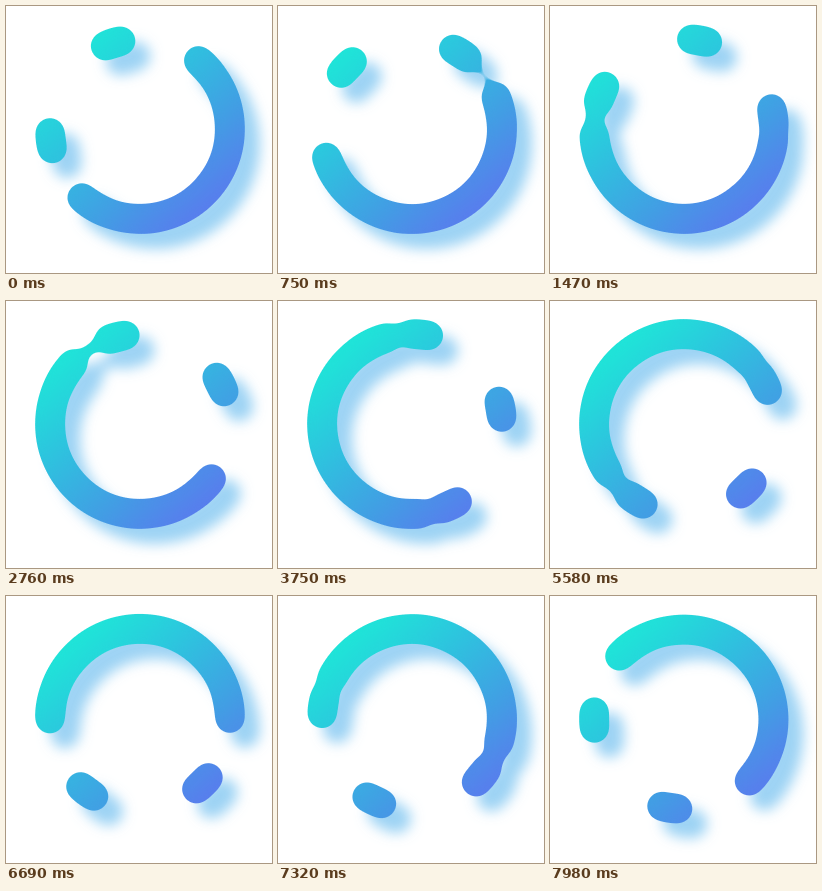
Animation, 266 px wide and 267 px high, one loop 8000 ms. Source, as an HTML page:

```html
<!DOCTYPE html>
<html lang="en">
<head>
<meta charset="utf-8">
<title>Gooey ring</title>
<style>
  html, body { margin: 0; width: 100%; height: 100%; overflow: hidden; background: #fff; }
  svg { display: block; width: 100%; height: 100%; }
  path { fill: none; stroke: url(#tint); stroke-width: 30; stroke-linecap: round; }
</style>
</head>
<body>
<svg viewBox="0 0 266 267">
  <defs>
    <linearGradient id="tint" gradientUnits="userSpaceOnUse" x1="70" y1="45" x2="204" y2="206">
      <stop offset="0" stop-color="#1fe4d8"/>
      <stop offset=".3" stop-color="#2cc6de"/>
      <stop offset=".7" stop-color="#429de4"/>
      <stop offset="1" stop-color="#5a7aee"/>
    </linearGradient>
    <filter id="goo" filterUnits="userSpaceOnUse" x="0" y="0" width="266" height="267"
            color-interpolation-filters="sRGB">
      <feGaussianBlur stdDeviation="5"/>
      <feColorMatrix values="1 0 0 0 0  0 1 0 0 0  0 0 1 0 0  0 0 0 12 -5.5" result="body"/>
      <feGaussianBlur in="body" stdDeviation="6.5"/>
      <feOffset dx="15" dy="15" result="soft"/>
      <feFlood flood-color="#8cccf2" flood-opacity=".85"/>
      <feComposite in2="soft" operator="in" result="shadow"/>
      <feMerge><feMergeNode in="shadow"/><feMergeNode in="body"/></feMerge>
    </filter>
  </defs>
  <g id="ring" filter="url(#goo)"></g>
</svg>
<script>
// Angles in degrees, clockwise from the right
const LOOP = 8000, CX = 134, CY = 123, RADIUS = 90, WIDTH = 30;
const GAP_START = 221, GAP_SPEED = 34.2;     // middle of the gap, degrees per second
const DOT_PHASE = 0.391, DOT_RATE = 2.2331;  // dots leaving the arc per second
const DOT_HALF = 5.3, TRAVEL = 110, DOT_STEP = 42.8;

const ring = document.getElementById('ring');
const addPath = () =>
  ring.appendChild(document.createElementNS('http://www.w3.org/2000/svg', 'path'));
const arc = addPath();
const dots = [-2, -1, 0, 1].map(slot => ({ slot, body: addPath(), neck: addPath() }));

const radians = degrees => degrees * Math.PI / 180;

function point(degrees) {
  const a = radians(degrees);
  return `${(CX + RADIUS * Math.cos(a)).toFixed(2)} ${(CY + RADIUS * Math.sin(a)).toFixed(2)}`;
}

function drawArc(path, from, to) {
  const large = Math.abs(to - from) > 180 ? 1 : 0;
  const sweep = to > from ? 1 : 0;
  path.setAttribute('d', `M${point(from)}A${RADIUS} ${RADIUS} 0 ${large} ${sweep} ${point(to)}`);
}

// The link between a dot and the arc thins as they part
function drawNeck(path, center, side, inner, outer) {
  const gap = outer - inner;
  const width = gap > 0 ? WIDTH - gap * gap / 40 : 0;
  path.style.display = width > 0 ? '' : 'none';
  if (width <= 0) return;
  path.style.strokeWidth = width;
  drawArc(path, center + side * inner, center + side * outer);
}

function frame(now) {
  const t = now % LOOP / 1000;
  const center = GAP_START + GAP_SPEED * t;
  const turns = DOT_PHASE - DOT_RATE * t;
  const phase = turns - Math.floor(turns);

  // The arc draws back a little each time it takes in and lets go of a dot
  const edge = 93 + 3 * Math.cos(2 * Math.PI * phase);
  drawArc(arc, center + edge, center + 360 - edge);

  // Dots cross the gap against the turn, eased at both ends
  for (const { slot, body, neck } of dots) {
    const offset = TRAVEL * Math.sin(radians(DOT_STEP * (phase + slot)));
    const angle = center + offset;
    drawArc(body, angle - DOT_HALF, angle + DOT_HALF);
    drawNeck(neck, center, Math.sign(offset), Math.abs(offset) + DOT_HALF, edge);
  }
  requestAnimationFrame(frame);
}
requestAnimationFrame(frame);
</script>
</body>
</html>
```
